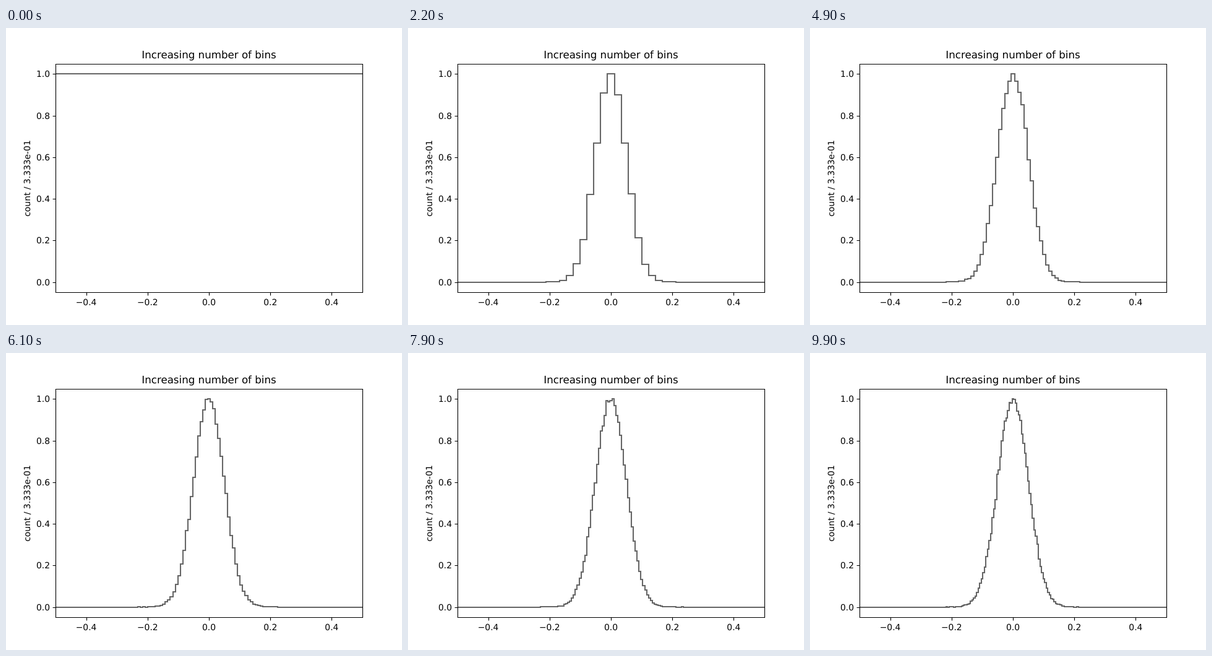
An HTML page for the animation above (10000 ms loop, 640 px wide and 480 px high).

```html
<!DOCTYPE html>
<html>
<head>
<meta charset="utf-8">
<style>
  html, body { margin: 0; width: 100%; height: 100%; overflow: hidden; background: #fff; }
  svg { display: block; }
  text { font: 13.89px "DejaVu Sans", sans-serif; text-anchor: middle; text-rendering: geometricPrecision; }
  .title { font-size: 16.67px; }
  .right { text-anchor: end; }
  path { fill: none; stroke: #000; stroke-width: 1.11; }
  #steps { stroke: #666; stroke-width: 2.08; }
</style>
</head>
<body>
<svg width="640" height="480" viewBox="0 0 640 480">
  <path id="steps"/>
  <path id="axes"/>
  <g id="labels">
    <text class="title" x="328" y="49">Increasing number of bins</text>
    <text transform="translate(39 243) rotate(-90)">count / 3.333e-01</text>
  </g>
</svg>
<script>
const SAMPLES = 1e5, SIGMA = 0.05, STEP_MS = 100, STEPS = 100;
const $ = id => document.getElementById(id);
const toX = v => 328 + 496 * v;
const toY = v => 410.534 - 336.134 * v;
const snap = Math.round;

function randomFrom(seed) {
  return () => {
    seed = seed + 0x6D2B79F5 | 0;
    let t = Math.imul(seed ^ seed >>> 15, 1 | seed);
    t = t + Math.imul(t ^ t >>> 7, 61 | t) ^ t;
    return ((t ^ t >>> 14) >>> 0) / 4294967296;
  };
}

// Histogram of a fresh normal sample, scaled to a peak of 1
function histogram(bins, seed) {
  const random = randomFrom(seed * 7919 + 17);
  const counts = new Array(bins).fill(0);
  for (let n = 0; n < SAMPLES; n++) {
    const r = SIGMA * Math.sqrt(-2 * Math.log(1 - random()));
    const v = r * Math.cos(2 * Math.PI * random());
    counts[Math.floor((v + 0.5) * bins)]++;
  }
  const peak = Math.max(...counts);
  return counts.map(c => c / peak);
}

function drawSteps(step) {
  const bins = 2 * step + 1;
  let d = "";
  histogram(bins, step).forEach((h, k) => {
    const y = snap(toY(h));
    d += k ? `V${y}` : `M80 ${y}`;
    d += `H${snap(toX((k + 1) / bins - 0.5))}`;
  });
  $("steps").setAttribute("d", d);
}

function drawAxes() {
  let d = "M80.5 58.5H576.5V427.5H80.5Z", labels = "";
  for (let k = -2; k <= 2; k++) {
    const x = toX(k / 5);
    d += `M${snap(x) + 0.5} 427.5v4.9`;
    labels += `<text x="${x}" y="448">${(k / 5).toFixed(1).replace("-", "\u2212")}</text>`;
  }
  for (let k = 0; k <= 5; k++) {
    const y = snap(toY(k / 5));
    d += `M80.5 ${y + 0.5}h-4.9`;
    labels += `<text class="right" x="71" y="${y + 5}">${(k / 5).toFixed(1)}</text>`;
  }
  $("axes").setAttribute("d", d);
  $("labels").innerHTML += labels;
}

let start, shown = 0;
function tick(now) {
  start ??= now;
  const step = Math.floor((now - start) / STEP_MS) % STEPS;
  if (step !== shown) drawSteps(shown = step);
  requestAnimationFrame(tick);
}

drawAxes();
drawSteps(0);
requestAnimationFrame(tick);
</script>
</body>
</html>
```
